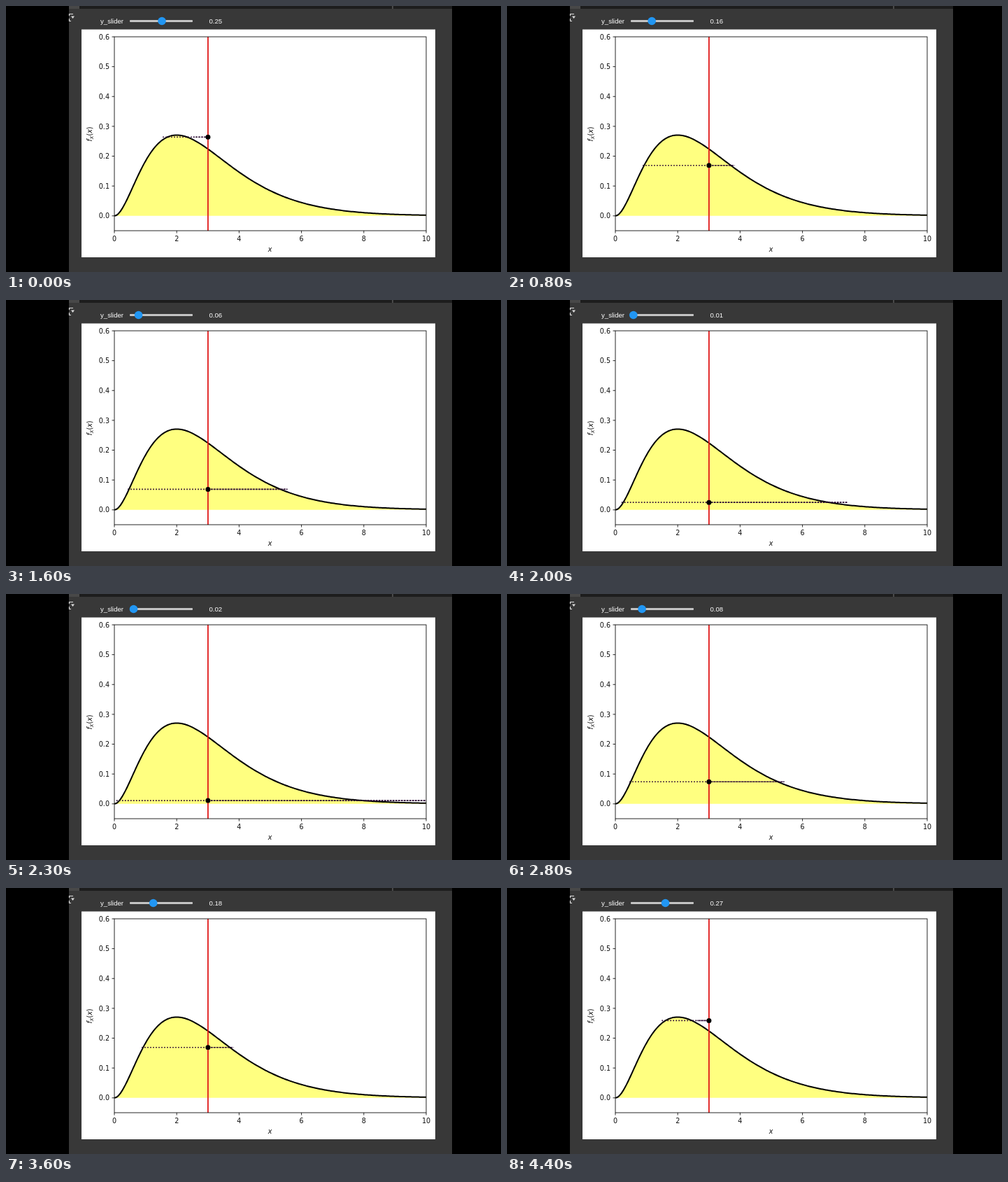
Write an HTML page that moves like this. It is 708 px wide and 380 px high and loops after 4.5 s.

```html
<!DOCTYPE html>
<html lang="en">
<head>
<meta charset="utf-8">
<title>Density level slider</title>
<style>
html, body { margin: 0; width: 100%; height: 100%; overflow: hidden; background: #000; }
svg { display: block; }
.ui { font: 9.6px "Liberation Sans", Arial, sans-serif; fill: #fff; }
.plot { font: 9.6px "DejaVu Sans", sans-serif; fill: #111; }
.italic { font-style: italic; }
.dots { stroke: #2a0633; stroke-width: 1.7; stroke-dasharray: 1.7 2.3; }
</style>
</head>
<body>
<svg width="708" height="380" viewBox="0 0 708 380">
  <rect x="90" width="548" height="380" fill="#383838"/>
  <rect x="90" width="548" height="4" fill="#1d1d1d"/>
  <rect x="90" width="15" height="4" fill="#484848"/>
  <rect x="552.5" width="1" height="4" fill="#777"/>
  <path d="M96 11.5H90.500V14M90.500 18V21.500H93" fill="none" stroke="#ddd" stroke-width="1.2"/>
  <path d="M93 14.500H98L95.500 18Z" fill="#ddd"/>
  <g class="ui">
    <text x="135" y="24.500">y_slider</text>
    <text id="value" x="290.500" y="24.500"></text>
  </g>
  <rect x="177" y="20" width="90" height="3" rx="1" fill="#c4c4c4"/>
  <circle id="knob" cy="21.500" r="5.800" fill="#2196f3"/>
  <rect x="108" y="33.500" width="506" height="325.500" fill="#fff"/>
  <path id="area" fill="#ffff80"/>
  <path id="curve" fill="none" stroke="#000" stroke-width="2"/>
  <path d="M288.900 44V321" stroke="#e01818" stroke-width="1.800"/>
  <line id="level" class="dots"/>
  <line id="right" class="dots"/>
  <circle id="point" cx="288.900" r="3.500"/>
  <rect x="155" y="44" width="446" height="277" fill="none" stroke="#111" stroke-width=".9"/>
  <path id="ticks" stroke="#111" stroke-width=".9"/>
  <g id="labels" class="plot">
    <text class="italic" x="377.500" y="350.500" text-anchor="middle">x</text>
    <text transform="translate(123 183) rotate(-90)" text-anchor="middle"><tspan class="italic">f</tspan><tspan class="italic" font-size="6.7" dy="1.600">X</tspan><tspan dy="-1.600">(</tspan><tspan class="italic">x</tspan>)</text>
  </g>
</svg>
<script>
const $ = id => document.getElementById(id);
const set = (id, attrs) => {
  for (const k in attrs) $(id).setAttribute(k, attrs[k]);
};
const LOOP = 4500, STEP = 100;
const px = x => 155 + 44.6 * x;
const py = y => 299.8 - 426.3 * y;
const density = x => x * x * Math.exp(-x) / 2;

// [time, value] pairs; the plot trails the slider a little
const sliderKeys = [[0, .25], [800, .16], [1600, .06], [2050, .004], [2200, .005],
  [2300, .02], [2800, .08], [3600, .18], [4400, .27]];
const plotKeys = [[0, .255], [800, .16], [1200, .11], [1600, .06], [1800, .036],
  [2150, .001], [2300, .002], [2800, .065], [3600, .16], [4400, .25]];

function sample(keys, t) {
  const i = keys.findIndex(k => k[0] >= t);
  if (i <= 0) return keys[0][1];
  const [t0, a] = keys[i - 1], [t1, b] = keys[i];
  return a + (b - a) * (t - t0) / (t1 - t0);
}

// bisection between a point under the level and one above it
function crossing(level, below, above) {
  for (let i = 0; i < 30; i++) {
    const mid = (below + above) / 2;
    if (density(mid) < level) below = mid; else above = mid;
  }
  return below;
}

function label(x, y, text, anchor) {
  $("labels").insertAdjacentHTML("beforeend",
    `<text x="${x}" y="${y}" text-anchor="${anchor}">${text}</text>`);
}

function drawPlot() {
  const pts = Array.from({ length: 201 }, (_, i) =>
    px(i / 20).toFixed(2) + " " + py(density(i / 20)).toFixed(2)).join("L");
  set("curve", { d: "M" + pts });
  set("area", { d: `M${px(0)} ${py(0)}L${pts}L${px(10)} ${py(0)}Z` });
  let d = "";
  for (let i = 0; i <= 6; i++) {
    const y = py(i / 10);
    d += `M151.500 ${y}H155`;
    label(148, y + 3.6, (i / 10).toFixed(1), "end");
  }
  for (let x = 0; x <= 10; x += 2) {
    d += `M${px(x)} 321V324.500`;
    label(px(x), 335.5, x, "middle");
  }
  set("ticks", { d });
}

function frame(now) {
  const t = Math.floor(now % LOOP / STEP) * STEP;
  const s = sample(sliderKeys, t), v = sample(plotKeys, t);
  set("knob", { cx: 179 + 176 * s });
  $("value").textContent = s.toFixed(2);
  const y = py(v + .009);
  const x1 = px(crossing(v, 0, 2)), x2 = px(crossing(v, 10, 2));
  set("level", { x1, x2: Math.max(x2, px(3)), y1: y, y2: y });
  set("right", { x1: px(3), x2, y1: y, y2: y });
  set("point", { cy: y });
  requestAnimationFrame(frame);
}

drawPlot();
frame(performance.now());
</script>
</body>
</html>
```
